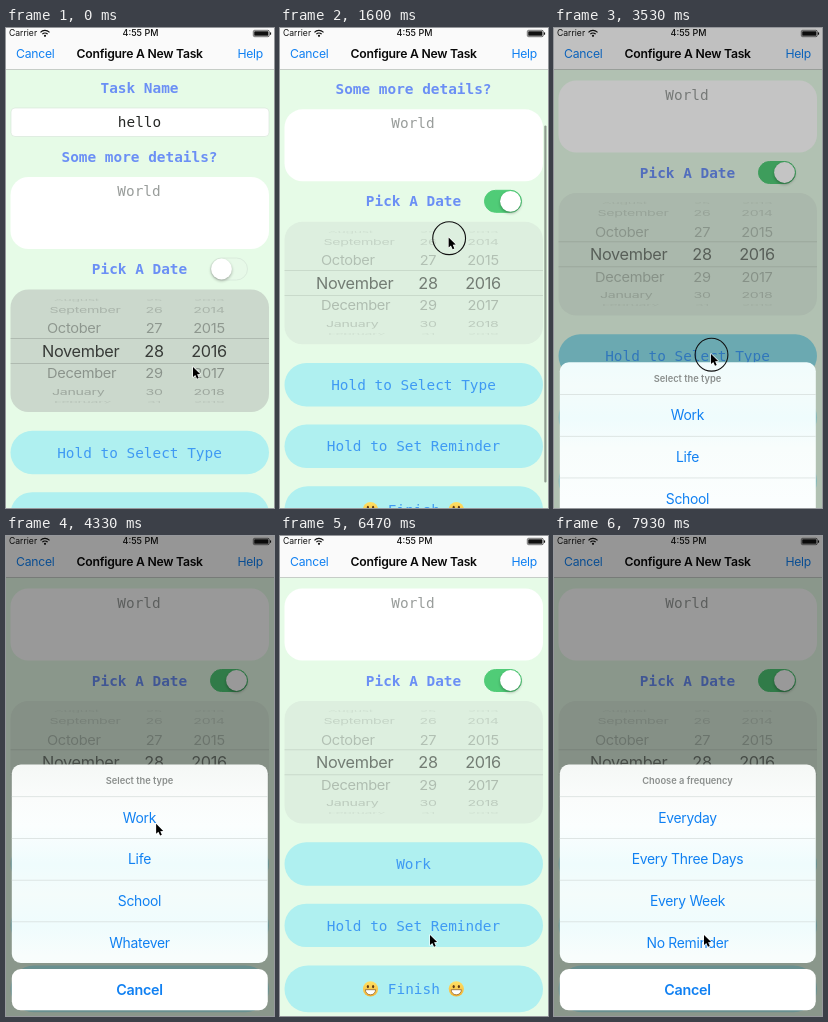
Write an HTML page with a canvas that moves like this. It is 268 px wide and 480 px high and loops after 8 s.

```html
<!DOCTYPE html>
<html lang="en">
<head>
<meta charset="utf-8">
<title>Configure A New Task</title>
<style>
html, body { margin: 0; width: 100%; height: 100%; overflow: hidden; background: #e6fbe7; }
canvas { display: block; width: 100vw; height: 100vh; }
</style>
</head>
<body>
<canvas id="stage"></canvas>
<script>
const W = 268, H = 480, LOOP = 8000;
const SANS = 'Inter, Roboto, sans-serif';
const MONO = '"DejaVu Sans Mono", monospace';
const BLUE = '#1080f2', LABEL = '#6b8ff5', BUTTON = '#aff0f0', BUTTON_TEXT = '#3f9af3';
const canvas = document.getElementById('stage');
const ctx = canvas.getContext('2d');

const clamp = v => Math.max(0, Math.min(1, v));
const smooth = v => v * v * (3 - 2 * v);
const ramp = (t, from, to) => smooth(clamp((t - from) / (to - from)));
const mix = (a, b, k) => a + (b - a) * k;
const mixRgb = (a, b, k) => `rgb(${a.map((v, i) => Math.round(mix(v, b[i], k)))})`;

// Cursor stops: time, x, y
const PATH = [
  [0, 187, 340], [120, 187, 340], [560, 222, 243], [800, 222, 243],
  [1130, 163, 287], [1320, 163, 287], [1800, 172, 165], [2120, 172, 165],
  [2600, 157, 327], [3750, 157, 327], [4600, 148, 277], [5850, 148, 277],
  [6350, 150, 400], [8000, 150, 400]
];
// Intervals in which the pointer is held down
const PRESSES = [[620, 760], [1180, 1850], [2770, 3720], [5690, 5790], [6650, 7500]];
const SHEETS = [
  { open: 3310, close: 5760, title: 'Select the type', rows: ['Work', 'Life', 'School', 'Whatever'] },
  { open: 7190, close: 9000, title: 'Choose a frequency', rows: ['Everyday', 'Every Three Days', 'Every Week', 'No Reminder'] }
];
// Picker rows: offset, font size, vertical squeeze, opacity, month x, month, day, year
const ROWS = [
  [-51, 14, .16, .09, 48, 'August', '25', '2013'],
  [-41, 14.2, .55, .17, 43.5, 'September', '26', '2014'],
  [-22.5, 14.6, .9, .3, 41, 'October', '27', '2015'],
  [0, 16.3, 1, .73, 36, 'November', '28', '2016'],
  [22.5, 14.6, .9, .32, 41, 'December', '29', '2017'],
  [41, 14.2, .55, .23, 46, 'January', '30', '2018'],
  [51, 14, .16, .09, 48, 'February', '31', '2019']
];

function box(x, y, w, h, r, fill, stroke) {
  ctx.beginPath();
  ctx.roundRect(x, y, w, h, r);
  if (fill) { ctx.fillStyle = fill; ctx.fill(); }
  if (stroke) { ctx.strokeStyle = stroke; ctx.stroke(); }
}

function disc(x, y, r, fill) {
  ctx.beginPath();
  ctx.arc(x, y, r, 0, 7);
  ctx.fillStyle = fill;
  ctx.fill();
}

function line(y, x0, x1, color) {
  ctx.fillStyle = color;
  ctx.fillRect(x0, y, x1 - x0, .7);
}

function write(str, x, y, size, color, { weight = 400, family = SANS, align = 'center' } = {}) {
  ctx.font = `${weight} ${size}px ${family}`;
  ctx.letterSpacing = family === SANS && size > 10 ? `${-.02 * size}px` : '0px';
  ctx.textAlign = align;
  ctx.textBaseline = 'alphabetic';
  ctx.fillStyle = color;
  ctx.fillText(str, x, y + size * .355);
}

const mono = (str, x, y, color, weight = 400) => write(str, x, y, 14.4, color, { weight, family: MONO });

function cursorAt(t) {
  const i = Math.max(1, PATH.findIndex(p => p[0] > t));
  const [a, b] = [PATH[i - 1], PATH[i]];
  const k = ramp(t, a[0], b[0]);
  return [mix(a[1], b[1], k), mix(a[2], b[2], k)];
}

function scrollAt(t) {
  if (t < 1850) return 108 * ramp(t, 1320, 1800);
  return 96.5 + 11.5 * Math.exp((1850 - t) / 145);
}

function drawSwitch(on) {
  ctx.lineWidth = 1;
  box(204.5, 230, 37, 22, 11, mixRgb([231, 249, 232], [80, 204, 119], on), mixRgb([218, 235, 220], [80, 204, 119], on));
  ctx.save();
  ctx.shadowColor = 'rgba(0,0,0,.3)';
  ctx.shadowBlur = 3;
  ctx.shadowOffsetY = 1.5;
  disc(mix(215.5, 230.5, on), 241, 10.4, '#fff');
  ctx.restore();
}

function drawPicker(on) {
  box(4.5, 261.5, 258.5, 122.5, 18, mixRgb([203, 216, 204], [221, 239, 223], on));
  const strength = mix(1, .66, on);
  for (const [dy, size, squeeze, alpha, x, month, day, year] of ROWS) {
    const color = `rgba(0,0,0,${alpha * strength})`;
    ctx.save();
    ctx.translate(0, 323 + dy);
    ctx.scale(1, squeeze);
    write(month, x, 0, size, color, { align: 'left' });
    write(day, 148, 0, size, color);
    write(year, 203, 0, size, color);
    ctx.restore();
  }
  const rule = `rgba(0,0,0,${.2 * strength})`;
  line(310, 4.5, 263, rule);
  line(335, 4.5, 263, rule);
}

function drawGrin(x, y) {
  const face = ctx.createLinearGradient(0, y - 8, 0, y + 8);
  face.addColorStop(0, '#ffe368');
  face.addColorStop(1, '#f5b333');
  disc(x, y, 7.6, face);
  for (const side of [-1, 1]) {
    ctx.beginPath();
    ctx.ellipse(x + side * 2.6, y - 2.2, 1.1, 1.7, 0, 0, 7);
    ctx.fillStyle = '#5d3a17';
    ctx.fill();
  }
  ctx.beginPath();
  ctx.arc(x, y + .9, 5.1, 0, Math.PI);
  ctx.closePath();
  ctx.fillStyle = '#fff';
  ctx.fill();
  ctx.lineWidth = .7;
  ctx.strokeStyle = '#85592a';
  ctx.stroke();
}

function drawForm(t) {
  const on = ramp(t, 740, 1000);
  const scroll = scrollAt(t);
  ctx.fillStyle = '#e6fbe7';
  ctx.fillRect(0, 0, W, H);
  ctx.save();
  ctx.translate(0, -scroll);
  mono('Task Name', 133.5, 60, LABEL, 700);
  ctx.lineWidth = .6;
  box(5, 80, 258, 28.5, 4, '#fff', '#d5e3d7');
  mono('hello', 133.5, 94, '#262826');
  mono('Some more details?', 133.5, 128.5, LABEL, 700);
  box(4.5, 149, 258.5, 72, 18, '#fff');
  mono('World', 133, 163, '#999d9b');
  mono('Pick A Date', 133.5, 241, LABEL, 700);
  drawSwitch(on);
  drawPicker(on);
  const held = t > 3310 && t < 3720;
  box(4.5, 402.8, 258.5, 43.4, 21.7, held ? '#8bdce6' : BUTTON);
  mono(t < 5780 ? 'Hold to Select Type' : 'Work', 133.5, 424.5, BUTTON_TEXT);
  box(4.5, 464.2, 258.5, 43.4, 21.7, BUTTON);
  mono('Hold to Set Reminder', 133.5, 486, BUTTON_TEXT);
  box(4.5, 526, 258.5, 46.7, 23.3, BUTTON);
  mono('Finish', 133.8, 549.5, BUTTON_TEXT);
  drawGrin(90.5, 549.3);
  drawGrin(176.3, 549.3);
  ctx.restore();

  const bar = ramp(t, 1300, 1400) * (1 - ramp(t, 2350, 2600));
  if (bar) {
    const top = 42 + Math.min(scroll, 96.5) * .82 + Math.max(0, scroll - 96.5);
    box(264.3, top, 2.2, Math.min(357, 478 - top), 1.1, `rgba(0,0,0,${.38 * bar})`);
  }
}

function drawHeader() {
  ctx.fillStyle = '#fafafa';
  ctx.fillRect(0, 0, W, 41.5);
  line(41.2, 0, W, '#b5bbb6');
  write('Carrier', 3, 5.3, 8.6, '#111', { align: 'left' });
  write('4:55 PM', 134.5, 5.3, 9, '#111', { weight: 500 });
  ctx.strokeStyle = '#111';
  ctx.lineWidth = 1.2;
  for (const r of [3.6, 6.2]) {
    ctx.beginPath();
    ctx.arc(39, 8.6, r, -Math.PI * .76, -Math.PI * .24);
    ctx.stroke();
  }
  disc(39, 7.8, 1.1, '#111');
  ctx.lineWidth = .6;
  box(247.3, 2.3, 16, 6.4, 1.4, null, '#111');
  box(248.2, 3.2, 14.2, 4.6, .6, '#111');
  box(264, 4.2, 1.1, 2.6, .5, '#111');
  write('Cancel', 10, 25.5, 12.2, BLUE, { align: 'left' });
  write('Configure A New Task', 133.7, 25.5, 12.2, '#080808', { weight: 600 });
  write('Help', 257, 25.5, 12.2, BLUE, { align: 'right' });
}

function drawSheet(t, { open, close, title, rows }) {
  const shown = ramp(t, open, open + 400) * (1 - ramp(t, close, close + 300));
  if (!shown) return;
  ctx.fillStyle = `rgba(0,0,0,${.4 * shown})`;
  ctx.fillRect(0, 0, W, H);
  const shift = (1 - shown) * 251;

  // Faint tint of the buttons behind the panel, fixed to the screen
  const tint = ctx.createLinearGradient(0, 229 - shift, 0, 474 - shift);
  const stops = [[229, '#f5f8f6'], [262, '#fafcfb'], [290, '#fbfefe'], [328, '#effcfd'],
    [358, '#f4fcfb'], [390, '#effcfd'], [420, '#f8fdfc'], [474, '#fbfefe']];
  for (const [y, color] of stops) tint.addColorStop((y - 229) / 245, color);

  ctx.save();
  ctx.translate(0, shift);
  box(5.8, 228.5, 256, 198.5, 9, tint);
  write(title, 133.5, 244.8, 9.3, '#8b8f8d', { weight: 600 });
  rows.forEach((row, i) => {
    const y = 281.6 + i * 41.7;
    line(y - 21.2, 5.8, 261.8, '#d4dcda');
    write(row, 133.5, y, 13.9, BLUE);
  });
  box(5.8, 433, 256, 41.3, 9, '#fff');
  write('Cancel', 133.5, 453.7, 14.3, BLUE, { weight: 600 });
  ctx.restore();
}

function drawPointer(t) {
  const [x, y] = cursorAt(t);
  if (PRESSES.some(([from, to]) => t >= from && t < to)) {
    ctx.beginPath();
    ctx.arc(x + .5, y - .3, 16.4, 0, 7);
    ctx.lineWidth = 1.1;
    ctx.strokeStyle = '#111';
    ctx.stroke();
  }
  ctx.save();
  ctx.translate(x, y - 1);
  ctx.beginPath();
  ctx.moveTo(0, 0);
  for (const [px, py] of [[0, 10], [2.3, 8], [4, 11.7], [5.7, 11], [4.1, 7.3], [7.1, 7.1]]) ctx.lineTo(px, py);
  ctx.closePath();
  ctx.lineJoin = 'round';
  ctx.lineWidth = 1.4;
  ctx.strokeStyle = 'rgba(255,255,255,.85)';
  ctx.stroke();
  ctx.fillStyle = '#000';
  ctx.fill();
  ctx.restore();
}

function resize() {
  const dpr = window.devicePixelRatio || 1;
  canvas.width = Math.round(innerWidth * dpr);
  canvas.height = Math.round(innerHeight * dpr);
}

function render(now) {
  const t = now % LOOP;
  ctx.setTransform(canvas.width / W, 0, 0, canvas.height / H, 0, 0);
  drawForm(t);
  drawHeader();
  for (const sheet of SHEETS) drawSheet(t, sheet);
  drawPointer(t);
}

const start = performance.now();
function tick() {
  render(performance.now() - start);
  requestAnimationFrame(tick);
}
addEventListener('resize', resize);
resize();
tick();
</script>
</body>
</html>
```
